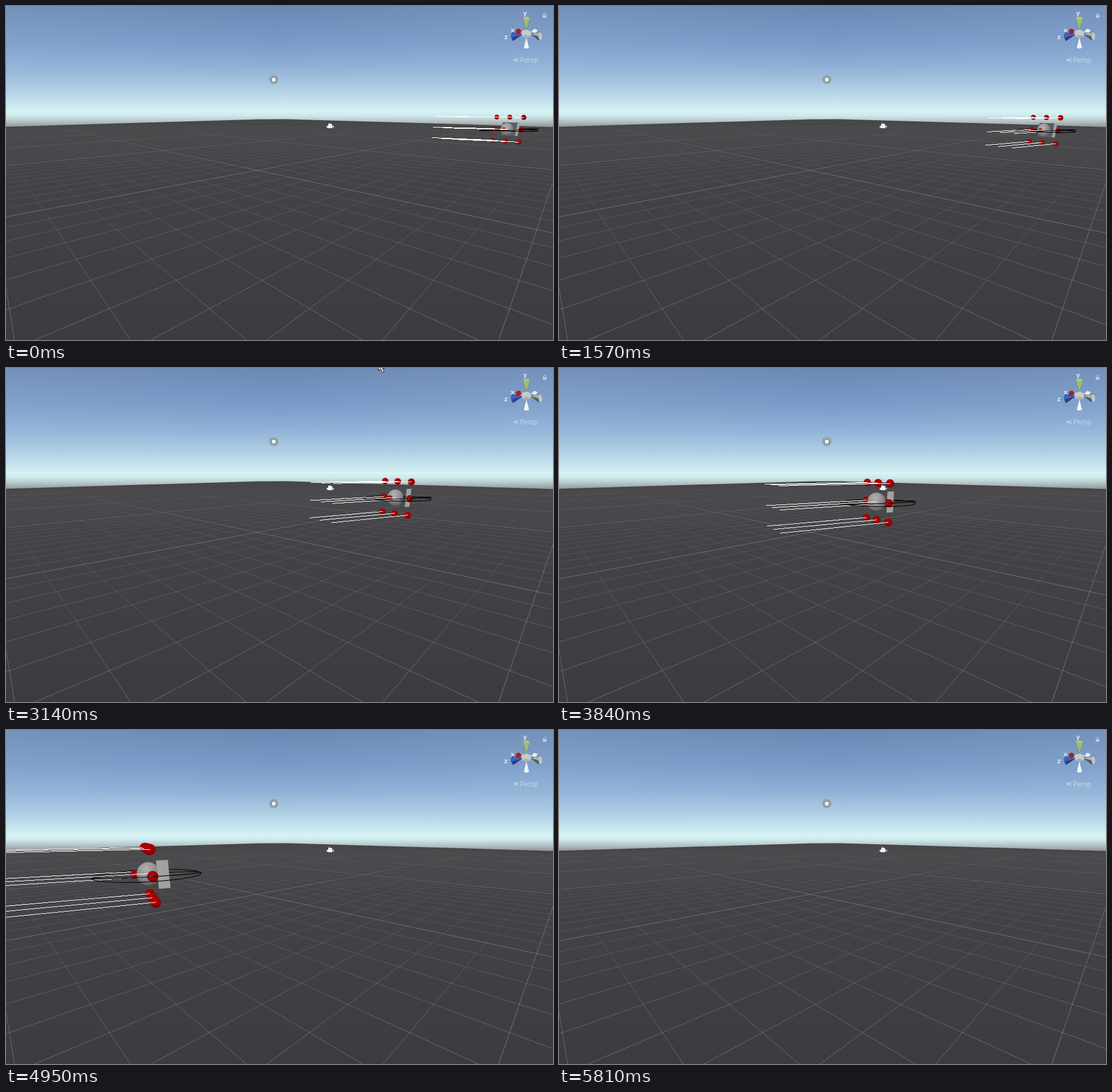
Animation of 957 by 585 pixels, one loop 6430 ms. Source, as an HTML page:

```html
<!DOCTYPE html>
<html lang="en">
<head>
<meta charset="utf-8">
<title>Scene view</title>
<style>
html, body { margin: 0; width: 100%; height: 100%; overflow: hidden; background: #3d3c41; }
svg { display: block; width: 957px; height: 585px; }
text { font-family: Inter, Roboto, sans-serif; fill: #eef4f5; }
</style>
</head>
<body>
<svg viewBox="0 0 957 585">
  <defs>
    <linearGradient id="sky" gradientUnits="userSpaceOnUse" x1="0" y1="0" x2="0" y2="213">
      <stop offset="0" stop-color="#6b87b3"/>
      <stop offset=".3" stop-color="#7a9ac8"/>
      <stop offset=".5" stop-color="#90b0d6"/>
      <stop offset=".68" stop-color="#afcde3"/>
      <stop offset=".8" stop-color="#c8e6ee"/>
      <stop offset=".87" stop-color="#d5f1f3"/>
      <stop offset=".905" stop-color="#cde7ea"/>
      <stop offset=".95" stop-color="#b3c2c4"/>
      <stop offset="1" stop-color="#8e9091"/>
    </linearGradient>
    <linearGradient id="sides">
      <stop offset="0" stop-color="#b4d2ea" stop-opacity=".13"/>
      <stop offset=".5" stop-color="#b4d2ea" stop-opacity="0"/>
      <stop offset="1" stop-color="#b4d2ea" stop-opacity=".13"/>
    </linearGradient>
    <linearGradient id="ground" gradientUnits="userSpaceOnUse" x1="0" y1="198" x2="0" y2="585">
      <stop offset="0" stop-color="#48474a"/>
      <stop offset=".3" stop-color="#434246"/>
      <stop offset="1" stop-color="#3c3b40"/>
    </linearGradient>
    <linearGradient id="fine" gradientUnits="userSpaceOnUse" x1="0" y1="205" x2="0" y2="585">
      <stop offset="0" stop-color="#fff" stop-opacity="0"/>
      <stop offset=".16" stop-color="#fff" stop-opacity=".05"/>
      <stop offset=".45" stop-color="#fff" stop-opacity=".12"/>
      <stop offset="1" stop-color="#fff" stop-opacity=".26"/>
    </linearGradient>
    <linearGradient id="bold" gradientUnits="userSpaceOnUse" x1="0" y1="205" x2="0" y2="585">
      <stop offset="0" stop-color="#fff" stop-opacity="0"/>
      <stop offset=".1" stop-color="#fff" stop-opacity=".11"/>
      <stop offset=".25" stop-color="#fff" stop-opacity=".23"/>
      <stop offset="1" stop-color="#fff" stop-opacity=".31"/>
    </linearGradient>
    <radialGradient id="body" cx=".42" cy=".3" r=".75">
      <stop offset="0" stop-color="#b4b2b3"/>
      <stop offset=".5" stop-color="#929092"/>
      <stop offset="1" stop-color="#575659"/>
    </radialGradient>
    <radialGradient id="ball" cx=".45" cy=".35" r=".7">
      <stop offset="0" stop-color="#b50303"/>
      <stop offset=".6" stop-color="#9d0000"/>
      <stop offset="1" stop-color="#640000"/>
    </radialGradient>
    <clipPath id="land"><path id="landShape" d="M0 211.5L200 205.5L440 198.5L490 198.3L760 206L957 212V585H0z"/></clipPath>
  </defs>

  <path fill="url(#sky)" d="M0 0H957V214H0z"/>
  <path fill="url(#sides)" d="M0 0H957V170H0z"/>
  <path fill="#dcf6f6" d="M0 182H957V185H0z" opacity=".7"/>
  <use href="#landShape" fill="url(#ground)"/>
  <g id="grid" clip-path="url(#land)" fill="none" stroke-width="1"></g>

  <g id="sun" fill="none" stroke="#747a78">
    <circle cx="468.5" cy="129" r="7" stroke-width="1.6" stroke-dasharray="2 1.6"/>
    <circle cx="468.5" cy="129" r="4.5" fill="#eef3e6" stroke-width="1.6"/>
  </g>

  <g id="craft"></g>

  <g id="camera" fill="#e9fafa">
    <circle cx="566" cy="208" r="2.4"/><circle cx="569" cy="208.5" r="2"/>
    <path d="M563 209H571V214H563zM561 210L564 211V213L561 213zM571 211L573.5 209.5V213.5z"/>
  </g>

  <g id="axes">
    <path d="M919 45L924 40L930 42L927 48z" fill="#e6f1f3"/>
    <path d="M904 21L910.5 42L917 21Q910.5 17 904 21z" fill="#9fbb78" stroke="#6c8455" stroke-width=".6"/>
    <path d="M904 21Q910.5 16 917 21Q910.5 24 904 21z" fill="#b3c98e"/>
    <path d="M910.5 55L906 73Q910.5 76 915 73z" fill="#eef5f5"/>
    <path d="M903 50L886 46Q881 53 887 61z" fill="#3c62c4" stroke="#28407f" stroke-width=".6"/>
    <path d="M903 50L890 59L887 61L886 55z" fill="#2b3c70"/>
    <path d="M917 49L936 45Q940 52 934 60z" fill="#a9b1b3" stroke="#555c60" stroke-width=".6"/>
    <path d="M917 49L930 59L934 60L931 53z" fill="#565d62"/>
    <ellipse cx="935" cy="53" rx="3" ry="7" fill="#c0c6c6"/>
    <path d="M902 44L911 41L919 45L918 53L910 56L903 53z" fill="#c5cbcb"/>
    <path d="M903 53L910 50L918 53L910 56z" fill="#a7b0b1"/>
    <circle cx="896.5" cy="44.5" r="4.7" fill="#a8211c"/>
    <g font-size="11" font-weight="600">
      <text x="905" y="16">y</text><text x="883" y="46">x</text><text x="871.5" y="58">z</text>
    </g>
    <text x="899.5" y="98.500" font-size="11.5" fill-opacity=".6">Persp</text>
    <path d="M897 90.500L888 94.500L897 98.500M888 94.500H897" fill="none" stroke="#e6eff2" stroke-opacity=".75"/>
    <path d="M939 16H945.500V20.500H939z" fill="#cdd5de" opacity=".85"/>
    <path d="M940.500 16V14.500A2 2 0 0 1 944.500 14.500V16" fill="none" stroke="#cdd5de" opacity=".85"/>
  </g>

  <path id="cursor" d="M0 0V16L4 12.500L7 19L10 18L7 11.500H12z" fill="#fff" stroke="#111" stroke-width="1"/>
</svg>
<script>
const LOOP = 6430, START = 950, STEP = 78.39, LAST = 62;
const $ = id => document.getElementById(id);

// Homogeneous screen vectors [x, y, w]; a point is drawn at x/w, y/w.
const ORIGIN = [767.5, 222.1, 1];
const FORWARD = [-20.15, -2.56, -0.01395];
const SIDE = [-7.4, -7.36, -0.04];
const DOWN = [5.74, 27.5, 0.012];
const IDLE_RAY = [-48.3, 20.8, 0.113];
const RAY_LENGTH = 9.4;

const mix = (base, ...terms) =>
  base.map((v, i) => terms.reduce((sum, [dir, n]) => sum + dir[i] * n, v));
const project = ([x, y, w]) => `${(x / w).toFixed(2)} ${(y / w).toFixed(2)}`;
const polyline = points => 'M' + points.map(project).join('L');

function buildGrid() {
  const origin = [439.3, 287.8, 1];
  const a = [50, 9.2, 0.05], b = [-2.5, 9.2, 0.05];
  const line = (along, across, n) => polyline(
    [-19.4 - n, Math.max(70, 40 - n)].map(m => mix(origin, [along, m], [across, n])));
  let fine = '', bold = '';
  for (let n = -50; n <= 50; n++) {
    const pair = line(a, b, n) + line(b, a, n);
    if (n % 10) fine += pair; else bold += pair;
  }
  $('grid').innerHTML =
    `<path d="${fine}" stroke="url(#fine)"/><path d="${bold}" stroke="url(#bold)"/>`;
}

// Travel: speeds up from rest, then constant velocity.
function travel(k) {
  const n = Math.max(0, k);
  return n - 20 + 6.1 * Math.max(0, 1 - n / 20) ** 2;
}

function drawCraft(k) {
  if (k >= LAST) return '';
  const u = travel(k);
  const at = (side, down, ahead = 0) =>
    mix(ORIGIN, [FORWARD, u + ahead], [SIDE, side], [DOWN, down]);

  const disc = (p, r, fill) =>
    `<circle cx="${p[0] / p[2]}" cy="${p[1] / p[2]}" r="${r}" fill="url(#${fill})"/>`;
  const ball = (p, size = 5.2) => disc(p, size / p[2], 'ball');

  const turn = Math.min(1, (k + 1) / 7);
  const ray = IDLE_RAY.map((v, i) => v + (FORWARD[i] * RAY_LENGTH - v) * turn);
  const rays = points => `<path d="${points.map(p => polyline([p, mix(p, [ray, 1])])).join('')}"
    fill="none" stroke="#fff" stroke-width="1" shape-rendering="crispEdges"/>`;

  const arc = (from, tilt) => {
    const points = [];
    for (let i = 0; i <= 32; i++) {
      const angle = from + Math.PI * i / 32, s = Math.sin(angle);
      points.push(at(2 * s, 0.05 + tilt * s, 3.2 * Math.cos(angle)));
    }
    return polyline(points);
  };
  const rings = from => `<path d="${arc(from, 0)}${arc(from, -0.17)}"
    fill="none" stroke="#050505" stroke-width="1.2"/>`;

  const face = (corners, fill) => `<path d="${polyline(corners)}z" fill="${fill}"/>`;
  const back = face([at(-.55, -.56, -.35), at(.55, -.56, -.35),
    at(.55, .56, -.35), at(-.55, .56, -.35)], '#5d5d60');
  const flank = face([at(.55, -.56, -.35), at(.55, -.56, -1.05),
    at(.55, .56, -1.05), at(.55, .56, -.35)], '#a3a1a0');

  const left = [-1, 0, 1].map(row => at(-1, row));
  const middle = [-1, 1].map(row => at(0, row));
  const right = [-1, 0, 1].map(row => at(1, row));
  const nose = at(0, 0, .9);
  const core = at(0, 0, .1);
  const sphere = disc(core, 12.9 / core[2] ** 0.8, 'body');
  const passed = u > 12;

  return rings(Math.PI)
    + left.map(p => ball(p)).join('') + rays(left)
    + (u < -6 ? back : '')
    + (passed ? ball(nose, 4) : '') + sphere + flank
    + (passed ? '' : ball(nose, 4))
    + middle.map(p => ball(p)).join('') + rays([...middle, at(0, 0)])
    + right.map(p => ball(p)).join('') + rays(right)
    + rings(0);
}

function cursorAt(t) {
  if (t >= 100 && t < 180) return [872, 558];
  if (t >= 180 && t < 250) return [757, 374];
  if (t >= 2830 && t < 3380) return [651.5, -11.5];
  return null;
}

let shown = null;
function render(t) {
  const k = t < START ? -1 : Math.min(LAST, Math.floor((t - START + 12) / STEP));
  if (k !== shown) {
    $('craft').innerHTML = drawCraft(k);
    shown = k;
  }
  const spot = cursorAt(t);
  $('cursor').setAttribute('visibility', spot ? 'visible' : 'hidden');
  if (spot) $('cursor').setAttribute('transform', `translate(${spot})`);
}

buildGrid();
render(0);
const begin = performance.now();
(function tick() {
  render((performance.now() - begin) % LOOP);
  requestAnimationFrame(tick);
})();
</script>
</body>
</html>
```
